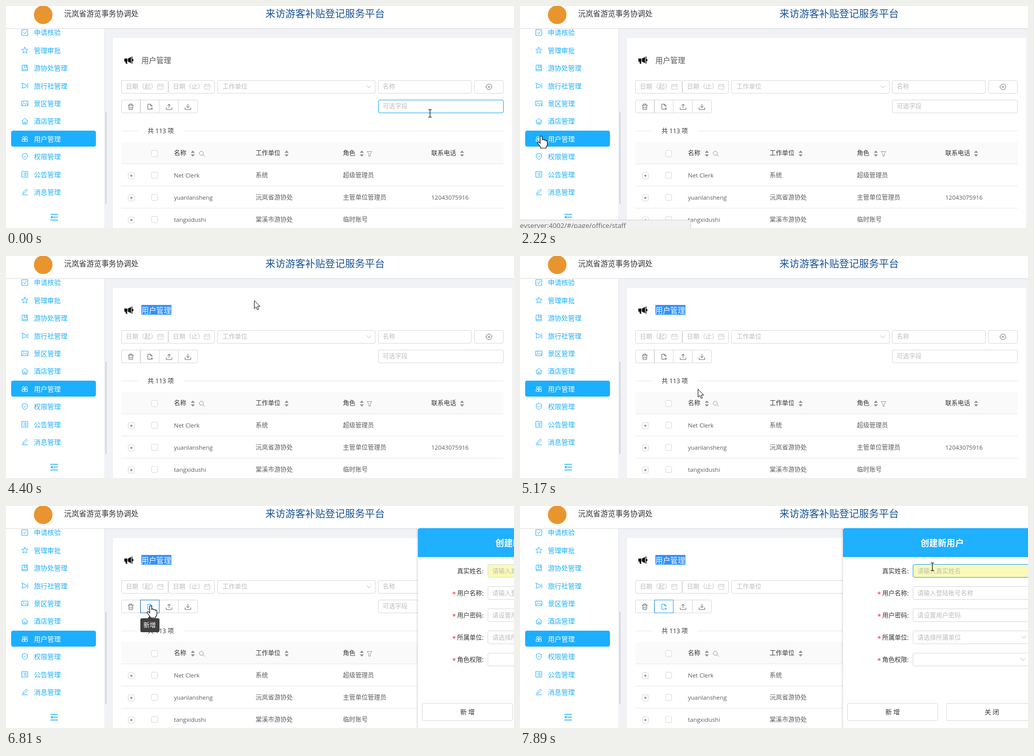
An HTML page for the animation above (8 s loop, 983 by 431 pixels).

```html
<!DOCTYPE html>
<html lang="zh-CN">
<head>
<meta charset="utf-8">
<title>用户管理</title>
<style>
html, body { margin: 0; width: 100%; height: 100%; overflow: hidden; background: #f0f2f5; }
svg { display: block; }
text { font-family: "Open Sans", "Noto Sans CJK SC", "Noto Sans CJK", sans-serif; white-space: pre; }
.line { fill: none; stroke-linecap: round; stroke-linejoin: round; }
</style>
</head>
<body>
<svg id="stage" width="983" height="431" viewBox="0 0 983 431"></svg>
<script>
const BLUE = '#1cafff', HOVER = '#20a3ee', EDGE = '#d9d9d9', HINT = '#bcbcbc', INK = '#333', SOFT = '#5c5c5c';
const LOOP = 8000;

// Text is placed by its left edge and vertical centre.
const text = (x, cy, str, size = 12, fill = INK, more = '') =>
  `<text x="${x}" y="${cy + size * 0.37}" font-size="${size}" fill="${fill}" ${more}>${str}</text>`;
const rect = (x, y, w, h, fill, more = '') =>
  `<rect x="${x}" y="${y}" width="${w}" height="${h}" fill="${fill}" ${more}/>`;
const box = (x, y, w, h, more = '', fill = '#fff') =>
  rect(x + 0.5, y + 0.5, w - 1, h - 1, fill, `rx="2.5" stroke="${EDGE}" ${more}`);
const icon = (x, y, d, color, width = 1) =>
  `<path class="line" transform="translate(${x} ${y})" d="${d}" stroke="${color}" stroke-width="${width}"/>`;
const rule = (x1, x2, y) => rect(x1, y, x2 - x1, 1, '#e8e8e8');

const CHEVRON = 'M-4-2L0 2.5L4-2';
const CALENDAR = 'M-5-4H5V5H-5ZM-5-1H5M-2.5-5.5V-3M2.5-5.5V-3';
const SHEET = 'M1 5H-4V-5H1L4-2V0M1-5V-2H4M3.5 2V6M1.5 4H5.5';

const menu = [
  ['申请核验', 'M-5.5-5.5H5.5V5.5H-5.5ZM-3 0L-.5 2.5L3-2.5'],
  ['管理审批', 'M0-6L1.8-2L6-1.6L2.9 1.2L3.8 5.5L0 3.3L-3.8 5.5L-2.9 1.2L-6-1.6L-1.8-2Z'],
  ['游协处管理', 'M-5-5.5H5V5.5H-5ZM-5 3H5M-1-5.5V-.5L1-2L3-.5V-5.5'],
  ['旅行社管理', 'M-5.5-5L3-1V2L-5.5 5L-4 0ZM5.5-4V5'],
  ['景区管理', 'M-6-4.5H6V4.5H-6ZM-5 3L-2-.5L1 2L3 0L5.5 3M-3.5-2.5H-2.5'],
  ['酒店管理', 'M-6 0L0-5.5L6 0M-4.2-1V5.5H4.2V-1M-1.5 5.5V2H1.5V5.5'],
  ['用户管理', 'M-4.5-2.5A2 2 0 0 1-.5-2.5V0H-2.5A2 2 0 0 1-4.5-2.5M.5-2.5A2 2 0 0 1 4.5-2.5A2 2 0 0 1 2.5 0H.5ZM-5 1H-.5V5H-5ZM.5 1H5V5H.5Z'],
  ['权限管理', 'M0-6L5-4V1Q4 4 0 6Q-4 4-5 1V-4ZM-2.3-.5L-.3 1.5L2.5-1.5'],
  ['公告管理', 'M-5.5-5.5H5.5V5.5H-5.5ZM-1-2.5H3M-1 0H3M-1 2.5H3M-3-2.5H-2.9M-3 0H-2.9M-3 2.5H-2.9'],
  ['消息管理', 'M-4 3L-3 0L3-5.5L5-3.5L-1 2.5ZM-5.5 5.5H5.5']
];

function sidebar() {
  let s = rect(0, 43, 190, 388, '#fff') + rect(190, 43, 1, 342, '#e8eaec') + rect(193, 205, 1, 179, '#b0b2b5');
  s += rect(10, 242, 164, 31, BLUE, 'rx="4"');
  menu.forEach(([name, d], i) => {
    const y = 51.5 + 34.4 * i, color = i === 6 ? '#fff' : BLUE;
    s += icon(36.5, y, d, color) + text(54, y, name, 13, color);
  });
  return s + icon(93, 410, 'M-6.5-5.5H7M-1.5 0H7M-6.5 5.5H7', BLUE, 1.3) +
    `<path d="M86 410L90 407V413Z" fill="${BLUE}"/>`;
}

function header() {
  return rect(0, 43, 983, 2, '#000', 'opacity=".03"') + rect(0, 0, 983, 43, '#fff') + rect(0, 43, 983, 1, '#e2e4e6') +
    '<circle cx="72" cy="17" r="18" fill="#e8952f"/>' +
    text(112.5, 15, '沅岚省游览事务协调处', 14.4, '#333') +
    text(502, 15, '来访游客补贴登记服务平台', 19.25, '#175294');
}

function filters() {
  let s = '<path d="M229 102H235V108H234L235 112H232L231 108H229ZM236 102L242 99V111L236 108Z" fill="#111"/>' +
    rect(243, 98, 1.5, 14, '#111') + rect(244, 103, 2.5, 4, '#111');
  s += text(262, 105.5, '用户管理', 14.4, '#555');
  s += box(223, 144, 91, 26) + text(232, 157, '日期（起）', 12, HINT) + icon(299, 156.5, CALENDAR, '#ccc');
  s += box(314, 144, 90, 26) + text(323, 157, '日期（止）', 12, HINT) + icon(389.5, 156.5, CALENDAR, '#ccc');
  s += box(409, 144, 306, 26) + text(419, 157, '工作单位', 12, HINT) + icon(702, 156.5, CHEVRON, HINT);
  s += box(720, 144, 181, 26) + text(729, 157, '名称', 12, HINT);
  s += box(906, 144, 57, 26) + icon(934.5, 157, 'M-2-2L2 2M2-2L-2 2M-5.5 0A5.5 5.5 0 1 1-5.5 .01', '#666');
  s += box(223, 182, 148, 26) + rect(259, 182, 2, 26, EDGE) + rect(296, 182, 1, 26, EDGE) + rect(333, 182, 1, 26, EDGE);
  s += icon(241.5, 195.5, 'M-5-3H5M-2-3V-5.5H2V-3M-4-3L-3.5 5.5H3.5L4-3M-1.5 0V3M1.5 0V3', '#666');
  s += icon(278.5, 195.5, SHEET, '#666');
  s += icon(315.5, 195.5, 'M-5.5 2V5.5H5.5V2M0 2V-5M-3-2L0-5L3-2', '#666');
  s += icon(352, 195.5, 'M-5.5 2V5.5H5.5V2M0 2V-5M-3-1L0 2L3-1', '#666');
  s += box(720, 182, 243, 26, 'id="field"') + text(729, 195, '可选字段', 12, HINT);
  return s + rule(223, 255, 242) + rule(343, 963, 242) + text(274, 242.5, '共 113 项', 12);
}

function table() {
  const sort = x => `<path d="M${x - 4} 285L${x} 280.5L${x + 4} 285ZM${x - 4} 288L${x} 292.5L${x + 4} 288Z" fill="#9b908f"/>`;
  const square = (x, y) => box(x, y - 6.5, 13, 13);
  const rows = [
    ['Net Clerk', '系统', '超级管理员', ''],
    ['yuanlansheng', '沅岚省游协处', '主管单位管理员', '12043075916'],
    ['tangxidushi', '棠溪市游协处', '临时账号', '']
  ];
  const cols = [325, 483, 652, 823];
  let s = rect(223, 264, 740, 43, '#fafafa') + rule(223, 963, 306) + square(281, 286.5);
  ['名称', '工作单位', '角色', '联系电话'].forEach((h, i) => s += text(cols[i], 286, h));
  s += [361.5, 543, 688.5, 882.5].map(sort).join('');
  s += icon(379, 286.5, 'M2.5 2.5L5.5 5.5M-5-.5A4 4 0 1 1-5-.49', '#999');
  s += icon(703.5, 287, 'M-4.5-4.5H4.5L1.5 0V4.5H-1.5V0Z', '#999');
  rows.forEach((row, i) => {
    const y = 328.5 + 43 * i;
    s += rule(223, 963, 349 + 43 * i) + square(281, y) + square(236, y + 1);
    s += icon(242.5, y + 1, 'M-2 0H2M0-2V2', '#666');
    row.forEach((v, k) => s += text(cols[k], y, v, /^[ -~]+$/.test(v) ? 11.5 : 12, SOFT));
  });
  return s;
}

function drawer() {
  const fields = [['真实姓名', '请输入真实姓名'], ['用户名称', '请输入登陆账号名称'], ['用户密码', '请设置用户密码'],
    ['所属单位', '请选择所属单位'], ['角色权限', '']];
  let s = '';
  for (let i = 1; i < 5; i++) s += rect(625 - i, 43, i, 388, '#000', 'opacity=".025"');
  s += rect(625, 43, 384, 388, '#fff') + '<path d="M625 99V47Q625 43 629 43H1009V99Z" fill="#1fb0ff"/>';
  s += rect(625, 99, 384, 1, '#cfeaf8');
  s += text(775, 72, '创建新用户', 16.8, '#fff', 'font-weight="700"');
  fields.forEach(([name, hint], i) => {
    const y = 126 + 43 * i;
    if (i) s += text(691.5, y + 2, '*', 13, '#f5222d');
    s += text(701, y + 0.5, name + ':');
    s += i ? box(760, y - 13, 235, 26) : box(760, y - 13, 235, 26, 'id="realName"', '#fafab8');
    s += text(769, y + 0.5, hint, 12, HINT);
  });
  s += icon(975, 254.5, CHEVRON, HINT) + icon(973, 297.5, CHEVRON, HINT);
  for (const [x, label] of [[633, '新 增'], [825, '关 闭']])
    s += box(x, 383, 176, 34) + text(x + 88, 400.5, label, 12.5, INK, 'text-anchor="middle"');
  return `<g id="drawer">${s}</g>`;
}

const overlays = () => `
  <clipPath id="picked"><rect id="pick" x="262" y="95" width="58" height="19"/></clipPath>
  <g id="selection" clip-path="url(#picked)">${rect(262, 95, 58, 19, '#3390ff') + text(262, 105.5, '用户管理', 14.4, '#fff')}</g>
  <g id="addButton">${rect(260.5, 182.5, 36, 25, '#fff', 'id="addEdge"') + icon(278.5, 195.5, SHEET, HOVER)}</g>
  <g id="tip"><path d="M274 218L278.5 213L283 218Z" fill="#404040"/>
    ${rect(260, 218, 37, 27, '#404040', 'rx="3"') + text(266, 231.5, '新增', 12, '#fff')}</g>`;

const status = () => `<g id="status">
  <path d="M-1 415.5H327Q330.5 415.5 330.5 419V432H-1Z" fill="#f1f1f1" stroke="#d0d0d0"/>
  ${text(0, 426.5, 'evserver:4002/#/page/office/staff', 13.2, '#666')}</g>`;

const cursors = () => `<g id="cursor">
  <path id="arrow" d="M.5.5V16L4 12.8L6.5 18.5L9 17.5L6.6 12H11.5Z" fill="#fff" stroke="#111"/>
  <path id="beam" class="line" d="M-3-7.5H-1L0-6.5L1-7.5H3M0-6.5V6.5M-3 7.5H-1L0 6.5L1 7.5H3" stroke="#111" stroke-width="1.2"/>
  <path id="hand" d="M-3 1.5Q-3-.5-1-.5T1 1.5V7.5Q1 6 3 6T5 8Q5.3 7 7 7T8.500 9Q9 8.300 10 8.500T11 10.500V15Q11 19 8.500 21V23H-2V21Q-5 17-7.500 13.500Q-8.500 11.500-7 11T-3 13.500Z" fill="#fff" stroke="#111" stroke-width="1.2"/></g>`;

const $ = id => document.getElementById(id);
$('stage').innerHTML = rect(0, 0, 983, 431, '#f0f2f5') + sidebar() + rect(207, 62, 772, 369, '#fff') +
  filters() + table() + header() + overlays() + drawer() + status() + cursors();

// Each pointer stroke: shape, start time, then points one tick apart.
const TICK = 110;
const strokes = [
  ['beam', 0, [820.5, 208.5]],
  ['beam', 560, [802, 206]],
  ['arrow', 670, [692, 203], [540, 199], [390, 196], [250, 194]],
  ['hand', 1120, [140, 190], [70, 206], [30, 246]],
  ['hand', 1460, [29, 252], [29, 257]],
  ['hand', 2000, [32, 256], [37, 254], [42, 253], [74, 237]],
  ['arrow', 2440, [150, 200], [233, 157], [292, 127], [314, 117]],
  ['arrow', 2870, [318, 112]],
  ['arrow', 2990, [321, 107]],
  ['beam', 3210, [319, 105], [304, 105], [284, 105], [262, 105], [243, 105]],
  ['arrow', 3970, [262, 102], [332, 94], [414, 85], [466, 83]],
  ['arrow', 4400, [480, 86]],
  ['arrow', 4530, [476, 130], [464, 196], [451, 240]],
  ['arrow', 4830, [441, 271], [417, 291], [382, 284], [344, 258], [312, 229], [293, 211]],
  ['hand', 5490, [283, 198], [281, 195]],
  ['hand', 5710, [281, 194]],
  ['arrow', 7370, [318, 184], [452, 154]],
  ['arrow', 7580, [617, 125], [745, 113]],
  ['beam', 7790, [798, 118], [811, 122]]
];
const pointer = strokes.flatMap(([shape, start, ...pts]) => pts.map(([x, y], i) => [start + i * TICK, shape, x, y]));
const pickLeft = [[0, 320], [3320, 305.5], [3430, 284], [3530, 262]];
const slide = [[0, 400], [6810, 172], [6930, 4], [7040, 0]];

const at = (rows, t) => rows.findLast(row => row[0] <= t);
const show = (id, on) => $(id).setAttribute('visibility', on ? 'visible' : 'hidden');
const within = (t, a, b) => t >= a && t < b;

function draw(t) {
  const [, shape, x, y] = at(pointer, t);
  $('cursor').setAttribute('transform', `translate(${x} ${y})`);
  for (const id of ['arrow', 'beam', 'hand']) show(id, id === shape);

  const left = at(pickLeft, t)[1];
  $('pick').setAttribute('x', left);
  $('pick').setAttribute('width', 320 - left);
  show('selection', left < 320);

  $('field').setAttribute('stroke', t < 670 ? HOVER : EDGE);
  $('realName').setAttribute('stroke', t >= 7890 ? HOVER : EDGE);
  show('addButton', t >= 5490);
  $('addEdge').setAttribute('stroke', within(t, 6480, 6930) ? '#1878d2' : HOVER);
  show('tip', within(t, 5710, 7480));
  show('status', within(t, 1460, 2990));
  $('drawer').setAttribute('transform', `translate(${at(slide, t)[1]} 0)`);
}

const start = performance.now();
function frame() {
  draw((performance.now() - start) % LOOP);
  requestAnimationFrame(frame);
}
frame();
</script>
</body>
</html>
```
